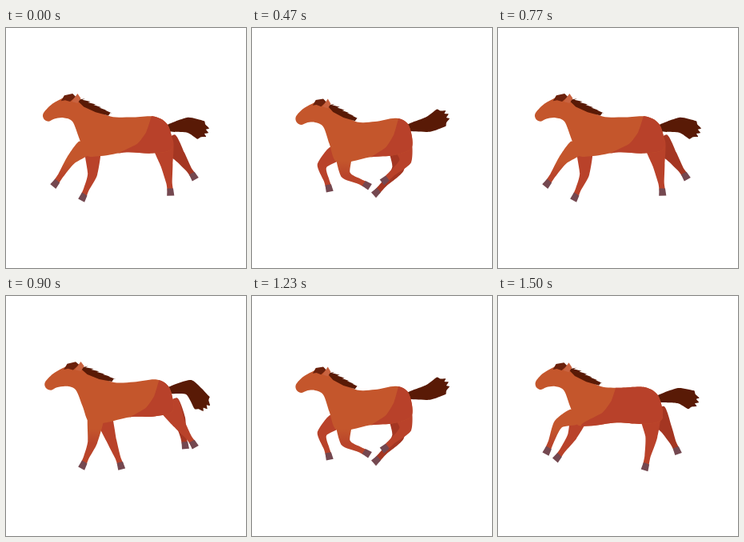
Animation of 300 by 300 pixels, one loop 1.53 s. Source, as an HTML page:

```html
<!DOCTYPE html>
<html lang="en">
<head>
<meta charset="utf-8">
<title>Galloping horse</title>
<style>
html, body { margin: 0; width: 100%; height: 100%; overflow: hidden; background: #fff; }
svg { display: block; width: 100vw; height: 100vh; }
</style>
</head>
<body>
<svg viewBox="0 0 300 300">
  <defs>
    <clipPath id="clip"><path id="clipBody"/></clipPath>
    <linearGradient id="shin" gradientUnits="userSpaceOnUse" x1="0" y1="166" x2="0" y2="184">
      <stop offset="0" stop-color="#c4562c"/><stop offset="1" stop-color="#b9442a"/>
    </linearGradient>
  </defs>
  <path id="tail" fill="#591a06"/>
  <path id="hindFar" fill="#a43622"/><path id="hindFarHoof" fill="#744850"/>
  <path id="foreFar" fill="#b9422a"/><path id="foreFarHoof" fill="#744850"/>
  <path id="hindNear" fill="#b9422a"/><path id="hindNearHoof" fill="#744850"/>
  <path id="body" fill="#c4562c"/>
  <path id="haunch" fill="#b8412a" clip-path="url(#clip)"/>
  <path id="foreNear" fill="url(#shin)"/><path id="foreNearHoof" fill="#744850"/>
  <path id="mane" fill="#591a06"/>
  <path id="forelock" fill="#6b210c"/>
  <path id="ear" fill="#c96340"/>
</svg>
<script>
const STRIDE = 765, POSES = 12;

const draw = (id, d) => document.getElementById(id).setAttribute("d", d);
const fmt = p => p[0].toFixed(1) + " " + p[1].toFixed(1);
const poly = pts => "M" + pts.map(fmt).join("L") + "Z";
const mix = (a, b, k) => [a[0] + (b[0] - a[0]) * k, a[1] + (b[1] - a[1]) * k];

// Phases are in poses; a wave peaks (or crosses zero, for sine) at the given pose.
const cosWave = (p, peak, rate = 1) => Math.cos((p - peak) * rate * 2 * Math.PI / POSES);
const sinWave = (p, start, rate = 1) => Math.sin((p - start) * rate * 2 * Math.PI / POSES);

// The stride passes through the trunk as a wave from head to rump.
function ripple([x, y], p) {
  const w = (x - 50) / 150;
  return [
    x + 4.5 * cosWave(p, 6 - 4.3 * w),
    y + (2 + 5.5 * w) * cosWave(p, 6 + 3.6 * w)
  ];
}

const outline = [
  [109,102], [132,113], [156,113], [184,110], [200,120], [204,148],
  [181,156], [151,157], [121,163], [103,162], [95,141], [87,120],
  [76,115], [65,116], [58,119], [52,116], [51,109], [60,99], [72,92], [83,88], [94,91]
];

const limbs = {
  fore: {
    root: [110, 152], mid: 105, widths: [20, 12, 7, 6.5],
    knee: p => [105 + 30 * sinWave(p, 1.8), 176 + 10 * sinWave(p, 1.8) + 5.7 * sinWave(p, 0.4, 2)],
    hoof: p => [109 + 49 * sinWave(p, 2.5), 202 + 8 * sinWave(p, 0.3) + 6.2 * sinWave(p, 1.45, 2)]
  },
  hind: {
    root: [193, 140], mid: 201, widths: [26, 15, 7.5, 6.5],
    knee: p => [201 + 18.5 * sinWave(p, 0), 166 - 11.5 * sinWave(p, 1)],
    hoof: p => [195 + 41 * sinWave(p, -0.5), 196 - 13.5 * sinWave(p, 1.2) - 5.5 * sinWave(p, 0.2, 2)]
  }
};

// Closed smooth curve through the points.
function smooth(pts, tension = 0.15) {
  const n = pts.length, at = i => pts[(i + n) % n];
  let d = "M" + fmt(pts[0]);
  for (let i = 0; i < n; i++) {
    const [a, b, c, e] = [at(i - 1), at(i), at(i + 1), at(i + 2)];
    const h1 = b.map((v, k) => v + (c[k] - a[k]) * tension);
    const h2 = c.map((v, k) => v - (e[k] - b[k]) * tension);
    d += "C" + [h1, h2, c].map(fmt).join(" ");
  }
  return d + "Z";
}

function unit(a, b) {
  const x = b[0] - a[0], y = b[1] - a[1], l = Math.hypot(x, y) || 1;
  return [x / l, y / l];
}

// Point reached from o by going along direction d and sideways from it.
const offset = (o, d, along, side) =>
  [o[0] + d[0] * along - d[1] * side, o[1] + d[1] * along + d[0] * side];

function sides(pts, widths) {
  const left = [], right = [], last = pts.length - 1;
  pts.forEach((q, i) => {
    const d = unit(pts[Math.max(0, i - 1)], pts[Math.min(last, i + 1)]);
    left.push(offset(q, d, 0, widths[i] / 2));
    right.unshift(offset(q, d, 0, -widths[i] / 2));
  });
  return [left, right];
}

// The far leg of each pair runs two poses ahead of the near one.
function drawLeg(kind, side, p) {
  const limb = limbs[kind], phase = side === "Far" ? p + 2 : p;
  const knee = limb.knee(phase), hoof = limb.hoof(phase), root = ripple(limb.root, p);
  root[0] += 0.35 * (knee[0] - limb.mid);
  const ankle = mix(knee, hoof, 0.65), d = unit(ankle, hoof);
  draw(kind + side, smooth(sides([root, knee, ankle, hoof], limb.widths).flat(), 0.11));
  draw(kind + side + "Hoof", poly([
    offset(hoof, d, -5, 3.5), offset(hoof, d, 4, 5), offset(hoof, d, 5, -4), offset(hoof, d, -4, -4)]));
}

function drawTail(p) {
  const base = ripple([199, 123], p);
  const lift = 3 + 14 * cosWave(p, 2) + 8 * cosWave(p, 3.3, 2);
  const mid = [base[0] + 25, base[1] - 4], end = [base[0] + 41, base[1] + lift * 0.8];
  const [left, right] = sides([base, mid, end], [8, 19, 24]);
  const d = unit(mid, end), tips = [];
  for (let k = 0; k <= 8; k++) {
    const s = 1 - k / 4, long = 9 * Math.sqrt(1 - s * s);
    tips.push(offset(end, d, k % 2 ? long - 2 : long + 2, s * 11));
  }
  draw("tail", smooth([...left, ...tips, ...right], 0.1));
}

function drawMane(p) {
  const a = ripple([92, 93], p), b = ripple([132, 112], p), d = unit(a, b);
  const len = Math.hypot(b[0] - a[0], b[1] - a[1]);
  const at = (k, up, along = 0) => offset(a, d, k * len + along, -up);
  const pts = [at(0, 0)];
  for (let k = 1; k <= 6; k++) pts.push(at(k / 6, 6.5 - k * 0.5, 1), at(k / 6, 3.2, -1.5));
  pts.push(at(0.95, -1), at(0.6, -4), at(0.25, -4));
  draw("mane", poly(pts));
}

function render(p) {
  const move = pts => pts.map(q => ripple(q, p));
  const body = smooth(move(outline));
  draw("body", body);
  draw("clipBody", body);

  // The shaded haunch spreads forward briefly as the hind legs push off.
  const spread = 38 * Math.max(0, cosWave(p, 10.8)) ** 8;
  const edge = [[188, 106], [181, 130], [170, 146], [145, 162]].map(([x, y]) => [x - spread, y]);
  draw("haunch", smooth(move([...edge, [145 - spread, 190], [240, 190], [240, 95], [188 - spread, 95]]), 0.08));

  for (const kind in limbs) for (const side of ["Near", "Far"]) drawLeg(kind, side, p);
  drawTail(p);
  drawMane(p);
  draw("forelock", poly(move([[73, 94], [77, 87], [87, 85], [91, 89], [84, 95], [78, 93]])));
  draw("ear", poly(move([[86, 95], [93, 85], [97, 91], [93, 97]])));
}

// Pose changes fall on whole hundredths of a second over two strides.
const starts = Array.from({ length: 2 * POSES }, (_, n) =>
  Math.round((Math.floor(n / POSES) * STRIDE + (n % POSES) * 200 / 3) / 10) * 10);

let origin = null, last = -1;
function tick(now) {
  if (origin === null) origin = now;
  const t = (now - origin) % (2 * STRIDE);
  const n = starts.filter(s => s <= t).length - 1;
  if (n !== last) render((last = n) % POSES);
  requestAnimationFrame(tick);
}
render(0);
requestAnimationFrame(tick);
</script>
</body>
</html>
```
